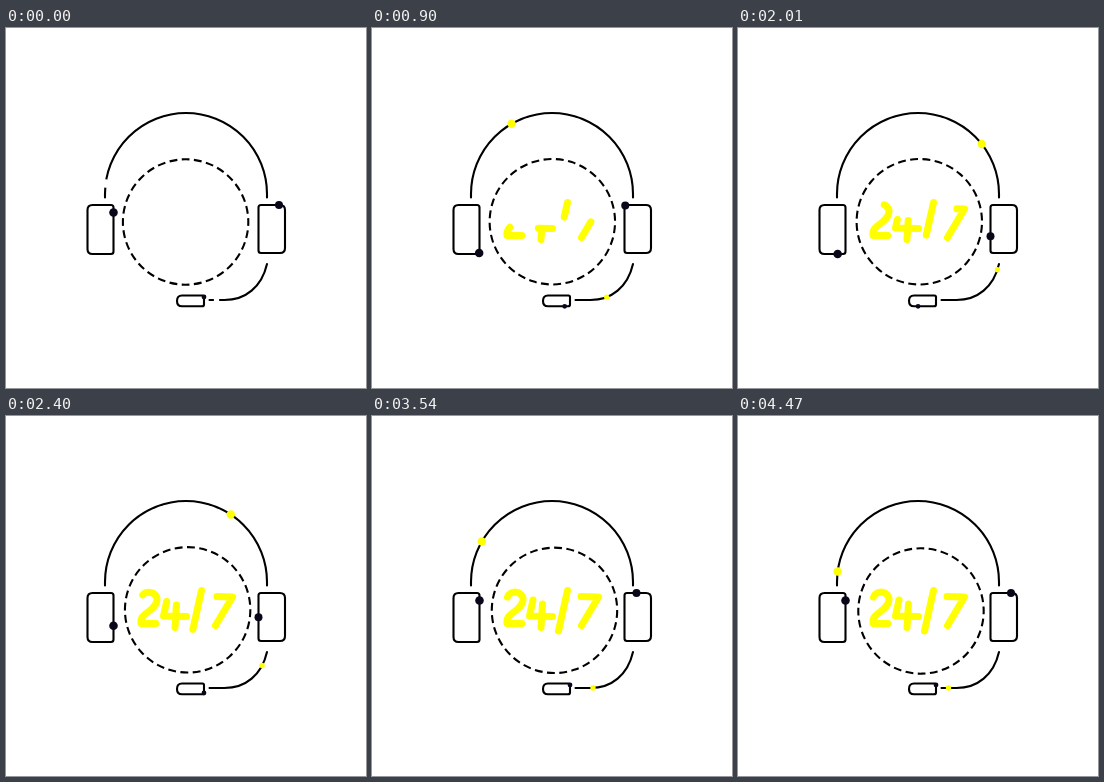
Recreate the animation shown at these times as an HTML page. Size 360x360 px, loop 4.5 s.

```html
<!DOCTYPE html>
<html lang="en">
<head>
<meta charset="utf-8">
<title>Support headset</title>
<style>
  html, body { margin: 0; width: 100%; height: 100%; overflow: hidden; background: #fff; }
  svg { display: block; width: 100%; height: 100%; }
  path, circle { fill: none; stroke: #000; stroke-width: 2.1; stroke-linecap: round; stroke-linejoin: round; }
  #ring { stroke-linecap: butt; }
  #digits path { stroke: #ff0; stroke-width: 7; }
  #dots circle { stroke: none; }
</style>
</head>
<body>
<svg viewBox="0 0 360 360">
  <circle id="ring" cx="179.6" cy="194" r="62.7" pathLength="32"
    stroke-dasharray="0.64 0.36" stroke-dashoffset="0.32"/>
  <path id="band" d="M99 169.500V166A81 81 0 0 1 261 166V169.500"/>
  <path id="left" d="M107.500 184V223.500Q107.500 226 105 226H86.500Q81.500 226 81.500 221V182Q81.500 177 86.500 177H105Q107.500 177 107.500 179.500Z"/>
  <path id="right" d="M273 177H255Q252.500 177 252.500 179.500V222.500Q252.500 225 255 225H274Q279 225 279 220V182Q279 177 274 177Z"/>
  <path id="cable" d="M203.500 272H216C240 273 256 258 261 236"/>
  <path id="mic" d="M198 269V276.500Q198 278.300 196 278.300H176Q171 278.300 171 273Q171 267.500 176 267.500H196.500Q198 267.500 198 269Z"/>
  <g id="digits">
    <path d="M150 207.500H135C134 200 140 198 145.500 193C151.500 188 152.500 182 149 178.500C145 175 138 175 135.500 181"/>
    <path d="M180.500 200.500L157.500 200L161 184"/>
    <path d="M169 211.500L170.500 188"/>
    <path d="M195.500 174.500L186.500 215"/>
    <path d="M209.500 209.500L226.500 181L209 180.500"/>
  </g>
  <g id="dots"></g>
</svg>
<script>
const LOOP = 4500, DRAW = 2500, FRAME = 30;
const YELLOW = '#ff0', NAVY = '#08081a';
const get = id => document.getElementById(id);
const clamp = x => Math.min(1, Math.max(0, x));
const ease = x => Math.sin(x * Math.PI / 2) ** 2;

// Goes out, waits and comes back; skew below 1 makes a slower landing
const swing = (out, wait, back, skew = 1) => t =>
  ease(clamp(t / out)) - ease(clamp((t - out - wait) / back) ** skew);

const long = swing(2100, 0, 2250, 0.7);
const dots = [
  { id: 'band', r: 4.2, from: 14, span: 191, move: long, color: YELLOW },
  { id: 'cable', r: 2.7, from: 7, span: 63, move: long, color: YELLOW },
  { id: 'right', r: 4, from: 0, span: 51, move: long, color: NAVY },
  { id: 'left', r: 4.3, from: 0.5, span: 54, move: swing(1350, 400, 1250), color: NAVY },
  { id: 'mic', r: 2.4, from: 0, span: 29, move: swing(1850, 0, 850), color: NAVY }
];
for (const dot of dots) {
  dot.node = document.createElementNS('http://www.w3.org/2000/svg', 'circle');
  dot.node.setAttribute('r', dot.r);
  get('dots').append(dot.node);
}

const strokes = [...document.querySelectorAll('#digits path')]
  .map(path => ({ path, len: path.getTotalLength() }));

function render(t) {
  // Yellow appears just after the loop begins
  const yellow = t < FRAME ? '#fff' : YELLOW;
  get('ring').setAttribute('transform', `rotate(${90 * t / LOOP} 180.8 196.2)`);
  get('digits').style.visibility = t < FRAME ? 'hidden' : 'visible';
  for (const { path, len } of strokes) {
    path.style.strokeDasharray = `${len * clamp(t / DRAW)} ${len + 20}`;
  }
  for (const { id, node, from, span, move, color } of dots) {
    const p = get(id).getPointAtLength(from + span * move(t));
    node.setAttribute('cx', p.x);
    node.setAttribute('cy', p.y);
    node.style.fill = color === YELLOW ? yellow : color;
  }
}

const start = performance.now();
function tick() {
  render((performance.now() - start) % LOOP);
  requestAnimationFrame(tick);
}
tick();
</script>
</body>
</html>
```
